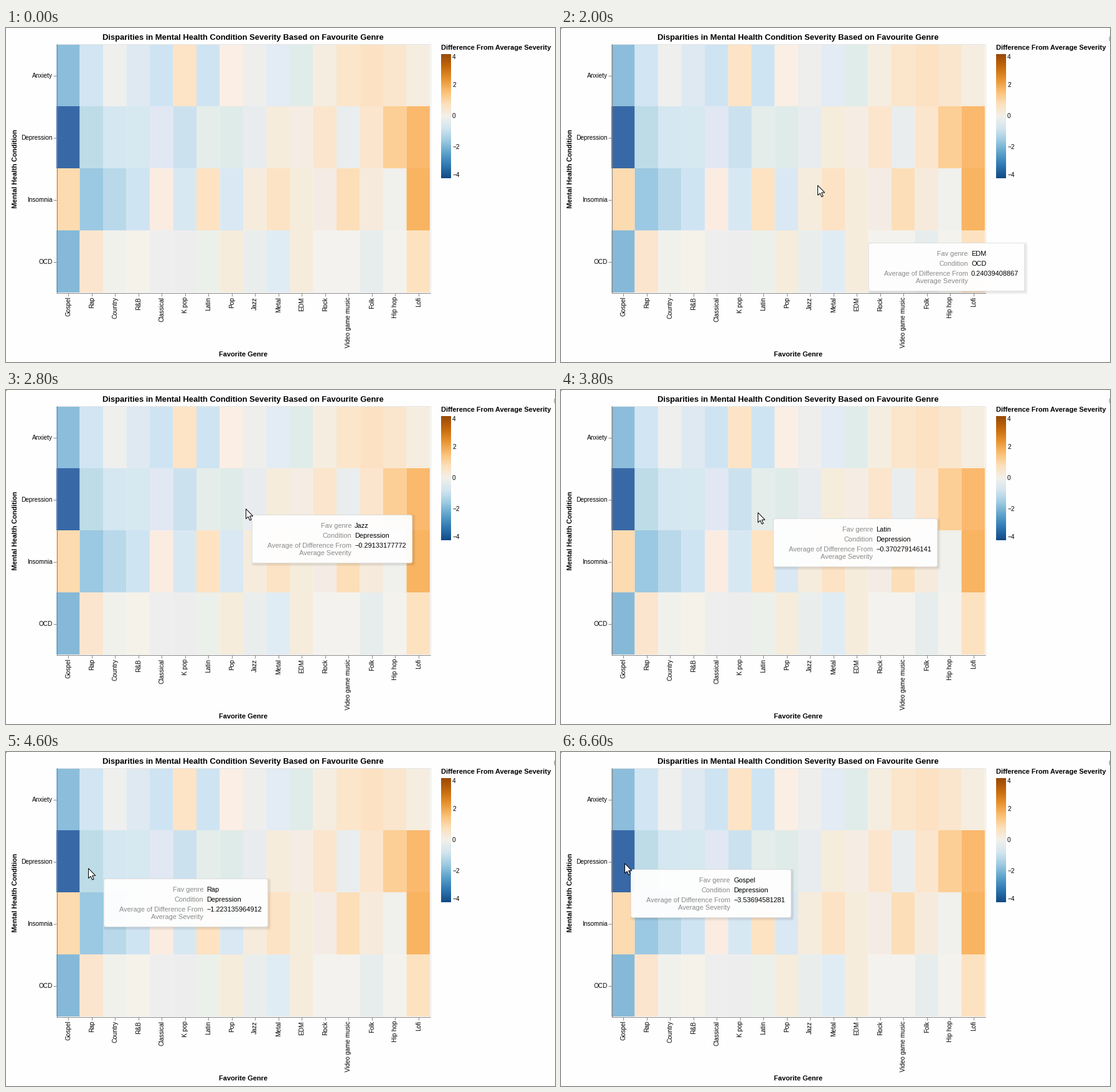
A matplotlib script for the animation above (6.8 s loop, 882 px wide and 538 px high).

```python
import numpy as np
import matplotlib.pyplot as plt
from matplotlib.animation import FuncAnimation
from matplotlib.colors import LinearSegmentedColormap
from matplotlib.patches import Circle, FancyBboxPatch, Polygon, Rectangle

W, H, DPI = 882, 538, 72          # at 72 dpi one point is one pixel
STEP, LOOP = 200, 6800
X0, Y0, CW, CH = 81, 26, 37.5, 100

GENRES = ["Gospel", "Rap", "Country", "R&B", "Classical", "K pop", "Latin", "Pop",
          "Jazz", "Metal", "EDM", "Rock", "Video game music", "Folk", "Hip hop", "Lofi"]
CONDITIONS = ["Anxiety", "Depression", "Insomnia", "OCD"]
HEAT = [
    "8cbddb d1e5f3 efefee dee9f2 cfe4f2 fde4c6 cfe4f2 fbeee4 "
    "eeeeec e3ebf4 e0ece9 f5ede0 fbe5cb fce2c3 f9e6cd f5eddf",
    "3868a6 bddce7 d5e7f1 d6e8f0 e1e8f3 cce1ee e4edea dfebe9 "
    "e8ecef f5ecdc f5ece3 fbe5cc e9edee fbe5cd fccf96 fab96d",
    "fddbb0 9bc8e2 b9d9ea cfe4f2 fbece2 d8e8f2 fde3c2 d9e8f3 "
    "f6ecdd fde3c5 f5ecdb f4ece4 fcdfb8 f6eadd f0f0ec f8b461",
    "86b9d8 fce5ce f1f1ec f5f2ea eeeeee ededed ecf0ea f5ecdb "
    "e9edec e0ecf4 f5ecdc f4f2ee f4f2ee e7edec f4f2ed fde2c0",
]
BLUE_ORANGE = ["#134b85", "#2f78b3", "#5da2cb", "#9dcae1", "#d2e5ef", "#f2f0eb",
               "#fce0ba", "#fbbf74", "#e8932f", "#c5690d", "#994a07"]
AVERAGES = {
    ("EDM", "OCD"): "0.24039408867",
    ("Jazz", "Depression"): "−0.29133177772",
    ("Latin", "Depression"): "−0.370279146141",
    ("K pop", "Depression"): "−0.916256157635",
    ("R&B", "Depression"): "−0.697865353038",
    ("Country", "Depression"): "−0.736945812807",
    ("Rap", "Depression"): "−1.223135964912",
    ("Gospel", "Depression"): "−3.53694581281",
}
# time, pointer x y, tooltip x y (the tooltip trails the pointer)
TRACK = np.array([
    (1800, 504, 366, -1, -1),
    (2000, 412, 253, 494, 346),
    (2200, 390, 210, 404, 229),
    (2400, 387, 195, 398, 207),
    (2600, 386, 191, 397, 202),
    (2800, 385, 191, 395, 201),
    (3600, 370, 192, 395, 201),
    (3800, 316, 197, 341, 207),
    (4000, 272, 197, 297, 207),
    (4200, 206, 197, 231, 207),
    (4400, 155, 192, 180, 206),
    (4600, 132, 187, 157, 204),
    (4800, 105, 178, 117, 196),
    (5000, 102, 179, 113, 189),
    (5200, 102, 179, 112, 189),
])
ARROW = np.array([(0, 0), (0, 16), (3.6, 12.6), (6.2, 18.4), (8.6, 17.4),
                  (6.1, 11.6), (11.2, 11.6)]) + 0.5

plt.rcParams["font.family"] = "Liberation Sans"
fig = plt.figure(figsize=(W / DPI, H / DPI), dpi=DPI, facecolor="#fefefe")
ax = fig.add_axes([0, 0, 1, 1])


def label(x, y, s, size=10, ha="left", color="black", bold=False, turn=0, z=3):
    return ax.text(x, y, s, size=size, ha=ha, va="baseline", color=color,
                   weight="bold" if bold else "normal", rotation=turn,
                   rotation_mode="anchor", zorder=z)


def line(x, y, color="#888888"):
    ax.plot(x, y, color=color, lw=1, solid_capstyle="butt", zorder=2)


def draw_chart():
    for r, row in enumerate(HEAT):
        for c, color in enumerate(row.split()):
            ax.add_patch(Rectangle((X0 + c * CW, Y0 + r * CH), CW, CH,
                                   fc="#" + color, lw=0, snap=False))
    right, bottom = X0 + 16 * CW + 0.5, Y0 + 4 * CH + 0.5
    line([X0, right, right], [Y0 - 0.5, Y0 - 0.5, bottom], "#e4e4e4")
    line([X0 + 0.5] * 2, [Y0, bottom])
    line([X0, right + 0.5], [bottom] * 2)
    for r, name in enumerate(CONDITIONS):
        y = Y0 + (r + 0.5) * CH
        line([X0 - 5, X0], [y + 0.5] * 2)
        label(X0 - 6.5, y + 3.5, name, ha="right")
    for c, name in enumerate(GENRES):
        x = X0 + (c + 0.5) * CW
        line([np.floor(x) + 0.5] * 2, [bottom, bottom + 5])
        label(x + 3.5, 433, name, ha="right", turn=90)
    label(381, 19, "Disparities in Mental Health Condition Severity Based on "
          "Favourite Genre", 13, "center", bold=True)
    label(381.5, 529, "Favorite Genre", 11, "center", bold=True)
    label(18, 227, "Mental Health Condition", 11, "center", bold=True, turn=90)


def draw_legend():
    label(699, 35, "Difference From Average Severity", 11, bold=True)
    cmap = LinearSegmentedColormap.from_list("blueorange", BLUE_ORANGE)
    ax.imshow(np.linspace(1, 0, 200)[:, None], cmap=cmap, aspect="auto",
              extent=(699, 715, 242, 42), interpolation="nearest")
    for s, y in zip(("4", "2", "0", "−2", "−4"), (50, 95, 145, 195, 240)):
        label(717, y, s)


def rounded(fc, z, **kw):
    box = FancyBboxPatch((0, 0), 10, 10, boxstyle="round,pad=0,rounding_size=3",
                         fc=fc, zorder=z, **kw)
    return ax.add_patch(box)


class Tooltip:
    ROWS = [("Fav genre", 21), ("Condition", 37),
            ("Average of Difference From", 53), ("Average Severity", 65)]

    def __init__(self):
        self.shadow = [rounded("black", 5, alpha=0.025, lw=0) for _ in range(4)]
        self.box = rounded((1, 1, 1, 0.97), 6, ec="#e5e5e5", lw=1)
        self.keys = [label(0, 0, s, 11, "right", "#8a8a8a", z=7) for s, _ in self.ROWS]
        self.values = [label(0, 0, "", 11, z=7) for _ in range(3)]
        self.parts = [*self.shadow, self.box, *self.keys, *self.values]

    def show(self, on):
        for p in self.parts:
            p.set_visible(on)

    def place(self, x, y):
        genre = GENRES[int((x - 10 - X0) // CW)]
        cond = CONDITIONS[int((y - 10 - Y0) // CH)]
        for key, (_, dy) in zip(self.keys, self.ROWS):
            key.set_position((x + 160, y + dy))
        texts = (genre, cond, AVERAGES[genre, cond])
        for val, s, (_, dy) in zip(self.values, texts, self.ROWS):
            val.set_text(s)
            val.set_position((x + 165, y + dy))
        w = round(175 + self.values[2].get_window_extent().width)
        self.box.set_bounds(x + 0.5, y + 0.5, w - 1, 77)
        for g, s in enumerate(self.shadow):
            s.set_bounds(x + 2 - g, y + 2 - g, w + 2 * g, 78 + 2 * g)


draw_chart()
draw_legend()
tip = Tooltip()
pointer = ax.add_patch(Polygon(ARROW, fc="white", ec="black", lw=1, zorder=9))
speck = ax.add_patch(Rectangle((0, 0), 1, 1, fc="#222222", lw=0, zorder=9))
rim = ax.add_patch(Circle((888, 17.5), 7, fc="none", ec="#888888", lw=1, zorder=9))
ax.set_xlim(0, W)
ax.set_ylim(H, 0)
ax.axis("off")


def update(i):
    t = i * STEP
    k = np.searchsorted(TRACK[:, 0], t, side="right") - 1
    speck.set_visible(t >= 1200)
    rim.set_visible(k >= 0)
    pointer.set_visible(k >= 0)
    tip.show(k >= 1)
    if k >= 0:
        _, px, py, tx, ty = TRACK[k]
        pointer.set_xy(ARROW + (px, py))
        if k >= 1:
            tip.place(tx, ty)
    return []


anim = FuncAnimation(fig, update, frames=LOOP // STEP, interval=STEP,
                     repeat=True, repeat_delay=0, blit=False)
plt.show()
```
